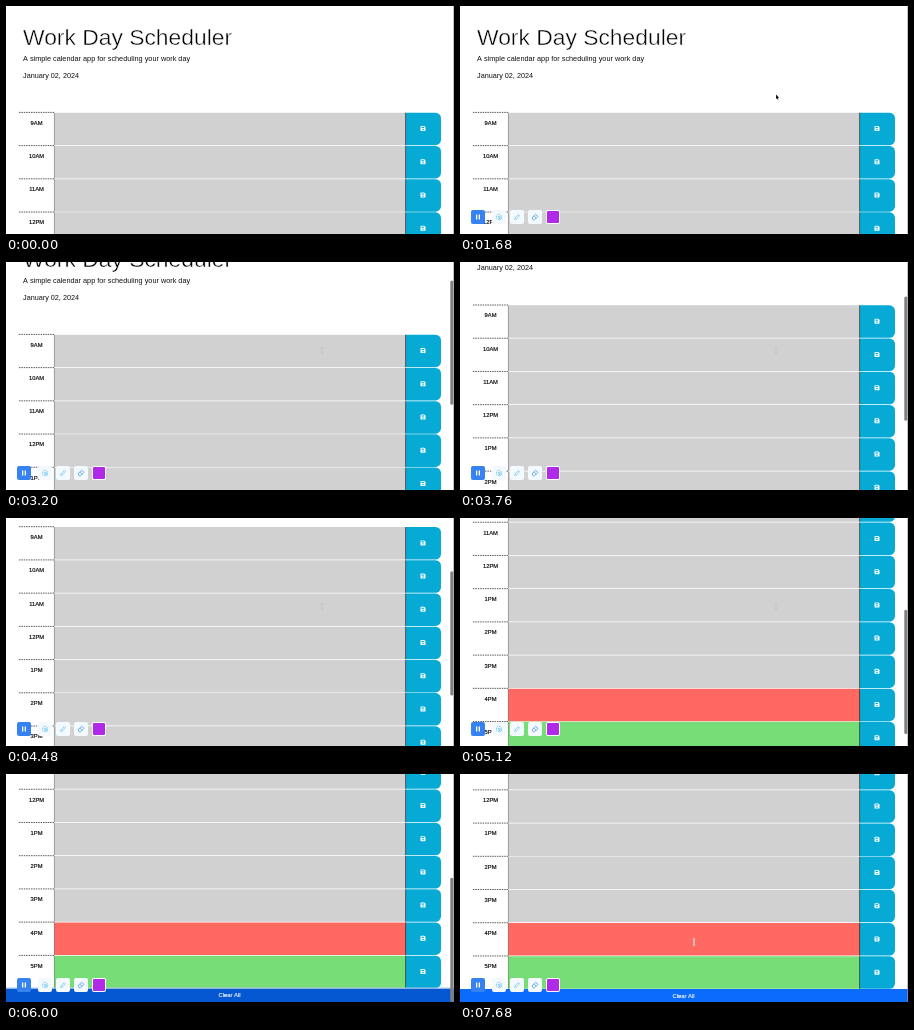
Recreate the animation shown at these times as an HTML page with a canvas. Size 448 by 228 pixels, loop 8000 ms.

```html
<!DOCTYPE html>
<html lang="en">
<head>
<meta charset="utf-8">
<title>Work Day Scheduler</title>
<style>
  html, body { margin: 0; width: 100%; height: 100%; overflow: hidden; background: #fff; }
  canvas { display: block; width: 448px; height: 228px; }
</style>
</head>
<body>
<canvas id="stage"></canvas>
<script>
const W = 448, H = 228, LOOP = 8000, STEP = 80;
const FONT = '"Liberation Sans", Arial, sans-serif';
const ROW_TOP = 106, PITCH = 33.22, FOOT_TOP = 405.2, PAGE_H = 418.5;
const HOURS = ['9AM', '10AM', '11AM', '12PM', '1PM', '2PM', '3PM', '4PM', '5PM'];
const BAR_Y = 204;

// Keyframes: [time, value...]
const SCROLL = [[2080, 0], [2600, 9], [3200, 34], [4000, 76], [4160, 78], [4480, 97.7],
  [4800, 136], [5120, 168.6], [5400, 182], [5840, 190.8], [6080, 190.8], [6400, 190.2]];
const POINTER = [[80, 380, 40], [640, 315, 88], [800, 316, 88.5], [5300, 316, 88.5],
  [5760, 290, 222], [7120, 234, 222], [7360, 234, 190], [7680, 234, 168]];

const canvas = document.getElementById('stage');
const c = canvas.getContext('2d');
const dpr = window.devicePixelRatio || 1;
canvas.width = W * dpr;
canvas.height = H * dpr;

const clamp = v => Math.max(0, Math.min(1, v));

function track(keys, t, k = 1) {
  if (t <= keys[0][0]) return keys[0][k];
  for (let i = 1; i < keys.length; i++) {
    const a = keys[i - 1], b = keys[i];
    if (t <= b[0]) return a[k] + (b[k] - a[k]) * (t - a[0]) / (b[0] - a[0]);
  }
  return keys[keys.length - 1][k];
}

function rect(x, y, w, h, color, r = 0) {
  c.fillStyle = color;
  c.beginPath();
  c.roundRect(x, y, w, h, r);
  c.fill();
}

function line(points, color, width) {
  c.strokeStyle = color;
  c.lineWidth = width;
  c.beginPath();
  points.forEach(([x, y]) => c.lineTo(x, y));
  c.stroke();
}

function text(str, x, y, size, color, align = 'left', outline = 0, outlineColor = color) {
  c.font = `${size}px ${FONT}`;
  c.textAlign = align;
  c.fillStyle = color;
  c.fillText(str, x, y);
  if (outline) {
    c.strokeStyle = outlineColor;
    c.lineWidth = outline;
    c.lineJoin = 'round';
    c.strokeText(str, x, y);
  }
}

function saveIcon(x, y) {
  rect(x - 2.5, y - 2.5, 5, 5, '#fff', [0.6, 1.6, 0.6, 0.6]);
  rect(x - 1.6, y - 1.6, 2.6, 1.1, '#06aad5');
  rect(x - 0.7, y + 0.4, 1.4, 1.2, '#06aad5');
}

function row(label, i) {
  const y = ROW_TOP + i * PITCH, h = PITCH - 0.7;
  const fill = label === '4PM' ? '#ff6961' : label === '5PM' ? '#77dd77' : '#d1d1d1';
  rect(48, y + 0.7, 352, h, fill);
  rect(400, y + 0.7, 35, h, '#06aad5', [0, 5.5, 5.5, 0]);
  line([[48.4, y + 0.7], [48.4, y + h + 0.7]], '#777', 0.6);
  line([[399.6, y + 0.7], [399.6, y + h + 0.7]], '#222', 0.7);
  c.setLineDash([1.5, 0.9]);
  line([[13, y + 0.4], [48, y + 0.4]], '#000', 0.65);
  c.setLineDash([]);
  text(label, 30.5, y + 12.8, 5.8, '#000', 'center', 0.15);
  saveIcon(417, y + 16.6);
}

function page(hover) {
  // a white outline slims the heading to a light weight
  text('Work Day Scheduler', 17, 38.9, 22.85, '#000', 'left', 0.5, '#fff');
  text('A simple calendar app for scheduling your work day', 17, 55.1, 7.3, '#111');
  text('January 02, 2024', 17, 71.8, 7.25, '#111');
  HOURS.forEach(row);
  rect(0, FOOT_TOP, W, 20, hover ? '#0557d2' : '#0a6bfd');
  if (hover) rect(0, FOOT_TOP - 1, W, 1, '#a9c8ee');
  text('Clear All', 223.5, FOOT_TOP + 8.6, 5.8, '#fff', 'center', 0.15);
}

function toolbar() {
  const y = BAR_Y, blue = '#45b4ea';
  rect(11, y, 14, 14, '#3682f1', 2);
  rect(16, y + 4.6, 1.3, 5, '#fff');
  rect(18.7, y + 4.6, 1.3, 5, '#fff');
  [32, 50, 68].forEach(x => rect(x, y, 14, 14, '#f3f9fd', 2));

  // spotlight
  c.setLineDash([1.2, 0.8]);
  c.strokeStyle = blue;
  c.lineWidth = 0.8;
  c.beginPath();
  c.arc(39, y + 7, 2.6, 1.6, 6.1);
  c.stroke();
  c.setLineDash([]);
  line([[38.4, y + 6.4], [41.8, y + 7.8], [40, y + 9.8], [38.4, y + 6.4]], blue, 0.7);
  // pen
  line([[54.7, y + 9.4], [55.2, y + 7.7], [58.3, y + 4.6], [59.5, y + 5.8],
    [56.4, y + 8.9], [54.7, y + 9.4]], blue, 0.6);
  // eraser
  line([[72, y + 7.8], [75.6, y + 4.3], [78, y + 6.4], [74.5, y + 9.9],
    [73.4, y + 9.9], [72, y + 7.8]], '#4a9fd8', 0.8);
  line([[73.8, y + 6.1], [76.2, y + 8.2]], '#4a9fd8', 0.8);

  rect(86, y, 14, 14, '#fff', 2);
  rect(87, y + 1, 12, 12, '#b12ae9', 1);
}

function pointer(x, y, scroll) {
  const top = ROW_TOP - scroll, foot = FOOT_TOP - scroll;
  if (y > foot) return;
  if (y > top && x > 48 && x < 400) {
    const beam = (color, w) => {
      line([[x - 1.1, y - 2.9], [x + 1.1, y - 2.9]], color, w);
      line([[x, y - 2.9], [x, y + 2.9]], color, w);
      line([[x - 1.1, y + 2.9], [x + 1.1, y + 2.9]], color, w);
    };
    beam('#d4d4d4', 1.5);
    beam('#aaa', 0.4);
    return;
  }
  c.beginPath();
  [[0, 0], [0, 4.6], [1, 3.7], [1.7, 5.2], [2.4, 4.9], [1.8, 3.5], [3.1, 3.3]]
    .forEach(([dx, dy]) => c.lineTo(x + dx, y + dy));
  c.closePath();
  c.strokeStyle = '#fff';
  c.lineWidth = 0.8;
  c.stroke();
  c.fillStyle = '#111';
  c.fill();
}

function draw(now) {
  const t = Math.floor(now % LOOP / STEP) * STEP;
  const scroll = track(SCROLL, t);
  const px = track(POINTER, t, 1), py = track(POINTER, t, 2);

  c.setTransform(dpr, 0, 0, dpr, 0, 0);
  rect(0, 0, W, H, '#fff');
  c.save();
  c.translate(0, -scroll);
  page(py > FOOT_TOP - scroll);
  c.restore();

  rect(447.4, 0, 0.6, H, '#999');
  c.globalAlpha = t < 2080 ? 0 : 1 - clamp((t - 6240) / 400);
  const thumb = H * H / PAGE_H;
  rect(444.3, Math.min(scroll * H / PAGE_H, H - thumb), 3, thumb, '#808080', 1.5);

  c.globalAlpha = clamp(t / 320);
  toolbar();
  c.globalAlpha = 1;
  if (t >= 80) pointer(px, py, scroll);
  requestAnimationFrame(draw);
}
requestAnimationFrame(draw);
</script>
</body>
</html>
```
